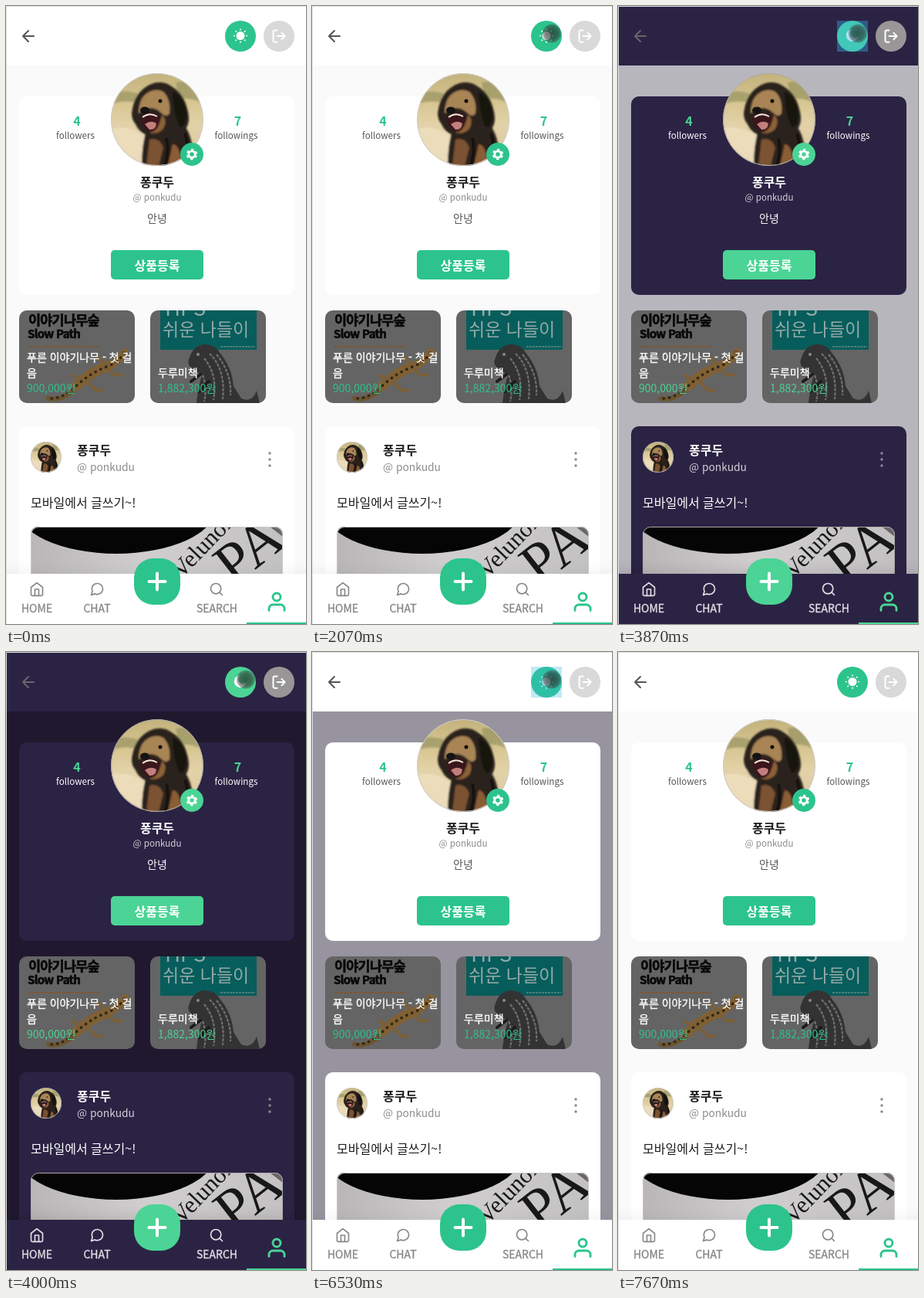
Animation, 389 px wide and 800 px high, one loop 8 s. Source, as an HTML page:

```html
<!DOCTYPE html>
<html lang="ko">
<head>
<meta charset="utf-8">
<title>Profile theme switch</title>
<style>
html, body { margin: 0; width: 100%; height: 100%; overflow: hidden; background: #fff; }
svg { display: block; width: 389px; height: 800px; font-family: "Noto Sans CJK KR", "Noto Sans CJK JP", "Noto Sans CJK", sans-serif; }
#app {
  --panel: #fff; --green: #2cc48c; --text: #1c1c1c; --sub: #555; --soft: #8c8c8c;
  --arrow: #555; --exit: #d9d9d9; --nav: #888; --edge: #ccc; --shade: .035;
}
#app.dark {
  --panel: #2b2344; --green: #4bd495; --text: #fff; --sub: #fff; --soft: #d2d0d8;
  --arrow: #69656d; --exit: #999697; --nav: #e2e0e6; --edge: #aaa; --shade: .08;
}
.panel { fill: var(--panel); }
.green { fill: var(--green); }
.text { fill: var(--text); }
.sub { fill: var(--sub); }
.soft { fill: var(--soft); }
.white { fill: #fff; }
.bold { font-weight: 700; }
.mid { text-anchor: middle; }
.line { fill: none; stroke-width: 2; stroke-linecap: round; stroke-linejoin: round; }
.s11 { font-size: 11.6px; }
.s14 { font-size: 14px; }
.s16 { font-size: 16px; }
text.medium, .medium text { stroke-width: .35px; }
.white.medium { stroke: #fff; }
.nav { fill: var(--nav); stroke: var(--nav); }
.moon, .dark .sun { display: none; }
.dark .moon { display: inline; }
.serif { font-family: "Liberation Serif", "Noto Serif", serif; fill: #181818; }
</style>
</head>
<body>
<svg id="app" viewBox="0 0 389 800">
  <defs>
    <clipPath id="round"><circle cx="60" cy="60" r="60"/></clipPath>
    <clipPath id="tile"><rect width="150" height="120" rx="10"/></clipPath>
    <clipPath id="photo"><rect x="32" y="674" width="327" height="180" rx="10"/></clipPath>
    <linearGradient id="field" x2="0" y2="1">
      <stop stop-color="#c3b27c"/><stop offset=".3" stop-color="#d6c590"/>
      <stop offset=".55" stop-color="#e3d2a8"/><stop offset="1" stop-color="#d9c6a0"/>
    </linearGradient>
    <linearGradient id="paper">
      <stop stop-color="#b9b6b7"/><stop offset=".45" stop-color="#d0cecf"/><stop offset="1" stop-color="#c3c1c2"/>
    </linearGradient>
    <linearGradient id="shade" x2="0" y2="1">
      <stop stop-opacity="0"/><stop offset=".5" stop-opacity=".3"/><stop offset="1"/>
    </linearGradient>
    <radialGradient id="touch">
      <stop stop-color="#222" stop-opacity=".68"/><stop offset=".7" stop-color="#2c2c2c" stop-opacity=".58"/>
      <stop offset="1" stop-color="#444" stop-opacity=".4"/>
    </radialGradient>
    <filter id="blur"><feGaussianBlur stdDeviation="1.200"/></filter>
    <g id="dog" clip-path="url(#round)">
      <rect width="120" height="120" fill="url(#field)"/>
      <g filter="url(#blur)">
        <path d="M0 26Q20 20 40 28L34 38Q16 34 0 40ZM84 12Q104 8 120 20V40Q104 30 88 34Z" fill="#989360" opacity=".7"/>
        <path d="M0 72Q24 66 44 82L42 120H0Z" fill="#efe0c0" opacity=".8"/>
        <path d="M46 74Q72 64 94 66Q108 82 107 120H40Q40 92 46 74Z" fill="#2b211b"/>
        <path d="M50 86Q62 82 68 96L62 120H46Z" fill="#7b5230"/>
        <path d="M80 92Q90 92 92 120H74Z" fill="#8b5d34"/>
        <path d="M28 46Q32 24 50 15Q66 7 80 18Q94 26 99 46Q104 62 97 72Q88 78 80 70Q70 82 54 81Q38 80 32 66Q25 58 28 46Z" fill="#2a211c"/>
        <path d="M44 28Q56 18 68 24Q78 34 76 52Q72 58 66 52Q52 38 36 52Q36 36 44 28Z" fill="#a98455"/>
        <path d="M66 54Q74 60 68 72Q60 80 50 77Q64 70 66 54Z" fill="#8c6239"/>
        <path d="M80 24Q94 30 98 50Q98 68 90 70Q82 58 80 24Z" fill="#151211"/>
        <path d="M38 57Q52 44 63 56Q65 70 54 76Q40 74 38 57Z" fill="#3a191a"/>
      </g>
      <path d="M44 66Q52 60 59 65Q58 74 50 73Z" fill="#c27f7c"/>
      <path d="M41 57Q50 50 60 56" fill="none" stroke="#eee6da" stroke-width="1.800"/>
      <ellipse cx="44" cy="48" rx="6" ry="4.500" fill="#151313"/>
      <circle cx="64" cy="36" r="2.500" fill="#0e0c0b"/>
      <path d="M72 84Q76 100 70 120M96 78Q102 96 98 116" fill="none" stroke="#18120e" stroke-width="4"/>
    </g>
  </defs>

  <rect id="page" width="389" height="800"/>
  <rect class="panel" width="389" height="77"/>
  <path class="line" stroke="var(--arrow)" d="M36 39H22m7 7l-7-7 7-7"/>

  <circle class="green" cx="304" cy="39" r="20"/>
  <g class="sun" transform="translate(304 38.500)">
    <circle class="white" r="5.500"/>
    <path class="line" stroke="#fff" style="stroke-width:1.700" d="M0-7.900v-.5M0 7.900v.5M-7.900 0h-.5M7.900 0h.5M5.600-5.600l.4-.4M5.600 5.600l.4 .4M-5.600-5.600l-.4-.4M-5.600 5.600l-.4 .4"/>
  </g>
  <path class="moon white" transform="translate(293 27.500) scale(.88)" d="M21 13.500A9 9 0 1 1 11.500 3 6.600 6.600 0 0 0 21 13.500z"/>
  <circle fill="var(--exit)" cx="354" cy="39" r="20"/>
  <path class="line" stroke="#fff" transform="translate(344 29) scale(.84)" style="stroke-width:2.400" d="M9 21H5a2 2 0 0 1-2-2V5a2 2 0 0 1 2-2h4m7 14l5-5-5-5m5 5H9"/>

  <rect class="panel" x="17" y="117" width="357" height="257" rx="10"/>
  <use href="#dog" transform="translate(136 87)"/>
  <circle cx="196" cy="147" r="59.500" fill="none" stroke="var(--edge)"/>
  <circle class="green" cx="241" cy="192" r="15"/>
  <g transform="translate(241 192)" fill="none" stroke="#fff">
    <circle r="4.200" stroke-width="2.800"/>
    <circle r="6.100" stroke-width="2.200" stroke-dasharray="3.190" transform="rotate(15)"/>
  </g>
  <g class="mid">
    <text class="green bold s16" x="92" y="155">4</text>
    <text class="sub s11" x="90" y="172">followers</text>
    <text class="green bold s16" x="300.500" y="155">7</text>
    <text class="sub s11" x="298.500" y="172">followings</text>
    <text class="text bold s16" x="196" y="234">퐁쿠두</text>
    <text class="soft s11" x="196" y="252">@ ponkudu</text>
    <text class="sub s14" x="196" y="280">안녕</text>
    <rect class="green" x="136" y="316" width="120" height="38" rx="5"/>
    <text class="white bold s16" x="196" y="342">상품등록</text>
  </g>

  <g transform="translate(17 394)" clip-path="url(#tile)">
    <rect width="150" height="120" fill="#646464"/>
    <g class="bold" fill="#080808" stroke="#080808" stroke-width=".6">
      <text x="12" y="19" font-size="17.500" letter-spacing="-.8">이야기나무숲</text>
      <text x="11" y="36" font-size="15" letter-spacing="-.7">Slow Path</text>
    </g>
    <path d="M12 47H105" stroke="#875321" stroke-width="1.500" stroke-dasharray="3 1"/>
    <g fill="none" stroke-linecap="round">
      <path d="M38 114Q56 118 74 100" stroke="#6d5530" stroke-width="6"/>
      <path d="M74 98Q92 80 116 72" stroke="#806033" stroke-width="13"/>
      <path d="M116 72Q130 66 137 54" stroke="#806033" stroke-width="10"/>
      <path d="M82 92l-12-8M88 92l12 12 8-1M112 74l12 10 9-1M112 70l-10-9" stroke="#7b5f38" stroke-width="4"/>
      <path d="M42 114Q58 114 76 96Q94 80 116 72Q130 66 136 55" stroke="#302719" stroke-width="3.500" stroke-dasharray=".5 7"/>
    </g>
    <text class="white medium s14" x="10" y="66">푸른 이야기나무 - 첫 걸</text>
    <text class="white medium s14" x="10" y="85.500">음</text>
    <text class="green s14" x="10" y="106">900,000원</text>
  </g>

  <g transform="translate(187 394)" clip-path="url(#tile)">
    <rect width="150" height="120" fill="#646464"/>
    <rect x="13" width="125" height="51" fill="#075d5b"/>
    <g fill="#93aaa9" font-weight="300">
      <text x="15" y="7" font-size="27">TIPS</text>
      <text x="16" y="33" font-size="23">쉬운 나들이</text>
    </g>
    <path d="M91 47h45" stroke="#8d9e9b" stroke-dasharray="3 1"/>
    <path d="M51 61Q55 47 69 44Q84 43 91 56Q106 74 108 98L118 114Q132 120 138 104L142 120H60Q62 100 67 84L56 76Q46 71 51 61Z" fill="#333"/>
    <path d="M77 56Q98 76 94 115M70 62Q88 84 82 116M86 57Q106 82 104 110M68 84Q74 100 70 118" fill="none" stroke="#707070" stroke-width="2.200" stroke-dasharray="4 1.500"/>
    <path d="M65 83l-12 9M76 92l-13 13" stroke="#1d1d1d" stroke-width="4" stroke-linecap="round"/>
    <circle cx="62" cy="57" r="2" fill="#888"/>
    <text class="white medium s14" x="10" y="85.500">두루미책</text>
    <text class="green s14" x="10" y="106">1,882,300원</text>
  </g>

  <rect class="panel" x="17" y="544" width="357" height="270" rx="10"/>
  <use href="#dog" transform="translate(32 564) scale(.3333)"/>
  <circle cx="52" cy="584" r="19.500" fill="none" stroke="var(--edge)"/>
  <text class="text bold s16" x="92" y="581">퐁쿠두</text>
  <text class="soft" x="92" y="601.500" font-size="13.800">@ ponkudu</text>
  <g fill="#8b8b8d"><circle cx="342" cy="579" r="1.700"/><circle cx="342" cy="587" r="1.700"/><circle cx="342" cy="595" r="1.700"/></g>
  <text class="text s16" x="32" y="648.500">모바일에서 글쓰기~!</text>
  <g clip-path="url(#photo)">
    <rect x="32" y="674" width="327" height="130" fill="url(#paper)"/>
    <ellipse cx="143" cy="648" rx="130" ry="61" fill="#050505"/>
    <path d="M342 674H359V687Z" fill="#686667"/>
    <text class="serif" font-size="31" transform="translate(227 742) rotate(-46)">Velunor</text>
    <text class="serif" font-size="76" transform="translate(295 752) rotate(-38)">PA</text>
  </g>
  <rect x="32.500" y="674.500" width="326" height="180" rx="10" fill="none" stroke="var(--edge)"/>

  <rect y="715" width="389" height="20" fill="url(#shade)" style="opacity:var(--shade)"/>
  <rect class="panel" y="735" width="389" height="65"/>
  <rect class="green" x="166" y="715" width="60" height="60" rx="25"/>
  <path class="line" stroke="#fff" style="stroke-width:4" d="M196 734.500v21M185.500 745h21"/>
  <g class="line" stroke="var(--nav)">
    <path transform="translate(30 745) scale(.833)" d="M3 9l9-7 9 7v11a2 2 0 0 1-2 2H5a2 2 0 0 1-2-2zM9 22V12h6v10"/>
    <path transform="translate(108 745) scale(.833)" d="M21 11.500a8.400 8.400 0 0 1-.9 3.800 8.500 8.500 0 0 1-7.600 4.700 8.400 8.400 0 0 1-3.800-.9L3 21l1.900-5.700a8.400 8.400 0 0 1-.9-3.800 8.500 8.500 0 0 1 4.700-7.600 8.400 8.400 0 0 1 3.800-.9h.5a8.500 8.500 0 0 1 8 8z"/>
    <path transform="translate(263 745) scale(.833)" d="M19 11a8 8 0 1 1-16 0 8 8 0 0 1 16 0zM21 21l-4.300-4.300"/>
  </g>
  <path class="line" stroke="var(--green)" style="stroke-width:2.300" transform="translate(336 756.200) scale(1.250)" d="M20 21v-2a4 4 0 0 0-4-4H8a4 4 0 0 0-4 4v2M16 7a4 4 0 1 1-8 0 4 4 0 0 1 8 0z"/>
  <g class="mid s14 nav medium">
    <text x="40" y="784.500">HOME</text>
    <text x="118" y="784.500">CHAT</text>
    <text x="273.500" y="784.500">SEARCH</text>
  </g>
  <rect class="green" x="312" y="798" width="77" height="2"/>

  <rect id="tap" x="284" y="19" width="40" height="40" fill="#33b5e5"/>
  <circle class="touch" r="12" fill="url(#touch)"/>
  <circle class="touch" r="12" fill="url(#touch)"/>
  <path d="M.5 800V.5H389" fill="none" stroke="#dedede"/>
</svg>
<script>
const LOOP = 8000;
const LIGHT = [250, 250, 250], DARK = [31, 24, 47];
const low = [250, 166], high = [253, 131], toggle = [311, 35.5];

// start ms, dark theme, page darkness, tap highlight, touch points
const steps = [
  [0, 0, 0, 0],
  [870, 0, 0, 0, low],
  [930, 0, 0, 0, low, high],
  [1530, 0, 0, 0],
  [1670, 0, 0, 0, [383, 13]],
  [1735, 0, 0, 0, [376, 12]],
  [1800, 0, 0, 0, [380, 6]],
  [1870, 0, 0, 0],
  [2070, 0, 0, 0, toggle],
  [3470, 0, 0, .4, toggle],
  [3870, 1, .3, .4, toggle],
  [3930, 1, .82, .2, toggle],
  [4000, 1, 1, 0, toggle],
  [6400, 1, 1, 0],
  [6470, 0, .95, .4, toggle],
  [6530, 0, .45, .3, toggle],
  [6600, 0, .08, .15, toggle],
  [6670, 0, 0, 0, toggle],
  [7670, 0, 0, 0]
];

const app = document.getElementById("app");
const page = document.getElementById("page");
const tap = document.getElementById("tap");
const touches = app.querySelectorAll(".touch");
const start = performance.now();
let shown;

function show([, dark, mix, glow, ...points]) {
  app.classList.toggle("dark", !!dark);
  const rgb = LIGHT.map((c, i) => Math.round(c + (DARK[i] - c) * mix));
  page.setAttribute("fill", `rgb(${rgb})`);
  tap.setAttribute("opacity", glow);
  touches.forEach((dot, i) => {
    const p = points[i];
    dot.setAttribute("visibility", p ? "visible" : "hidden");
    if (p) dot.setAttribute("transform", `translate(${p})`);
  });
}

function tick() {
  const t = (performance.now() - start) % LOOP;
  const step = steps.findLast(s => s[0] <= t);
  if (step !== shown) show(shown = step);
  requestAnimationFrame(tick);
}
tick();
</script>
</body>
</html>
```
